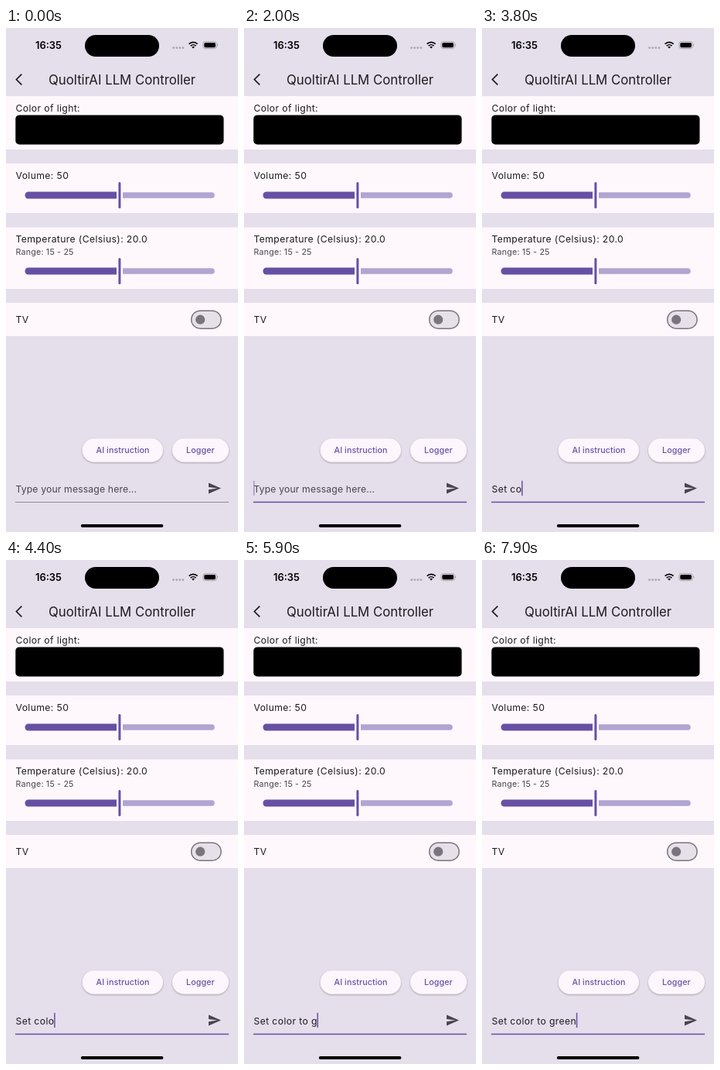
Animation of 300 by 651 pixels, one loop 8 s. Source, as an HTML page:

```html
<!DOCTYPE html>
<html lang="en">
<head>
<meta charset="utf-8">
<title>LLM Controller</title>
<style>
  html, body { margin: 0; width: 100%; height: 100%; overflow: hidden; background: #e5deeb; }
  svg { display: block; width: 300px; height: 651px; }
  text { font-family: Inter, Roboto, sans-serif; font-optical-sizing: none; fill: #1d1b20; white-space: pre; }
  .title { font-size: 16.8px; }
  .body { font-size: 12.2px; letter-spacing: .38px; }
  .small { font-size: 10.7px; letter-spacing: .19px; fill: #49454f; }
  .label { font-size: 10.7px; letter-spacing: .08px; font-weight: 500; fill: #6750a4; text-anchor: middle; }
  .clock { font-size: 12.9px; font-weight: 600; fill: #000; }
  #hint { letter-spacing: .15px; fill: #49454f; }
  .card { fill: #fef8fd; }
  .pill { fill: #fdf6fc; filter: drop-shadow(0 1px 1px rgba(0, 0, 0, .27)); }
  .purple { fill: #6750a4; }
</style>
</head>
<body>
<svg viewBox="0 0 300 651">
  <defs>
    <g id="slider">
      <path class="purple" d="M143-4.5H29a4.5 4.5 0 0 0 0 9H143z"/>
      <path fill="#b1a5d2" d="M151-3.8H266a3.8 3.8 0 0 1 0 7.6H151z"/>
      <rect class="purple" x="145.4" y="-17" width="3" height="34" rx="1.5"/>
    </g>
  </defs>
  <rect width="300" height="651" fill="#e5deeb"/>

  <!-- status bar -->
  <text class="clock" x="38" y="27.2">16:35</text>
  <rect x="102" y="9" width="96" height="28" rx="14"/>
  <g fill="#aaa4ae">
    <circle cx="216.6" cy="25.6" r="1.4"/><circle cx="220.7" cy="25.6" r="1.4"/>
    <circle cx="224.8" cy="25.6" r="1.4"/><circle cx="228.9" cy="25.6" r="1.4"/>
  </g>
  <g fill="none" stroke="#000" stroke-width="1.7">
    <path d="M236.6 20.7a7.8 7.8 0 0 1 11 0"/>
    <path d="M238.7 23.1a4.9 4.9 0 0 1 6.8 0"/>
  </g>
  <path d="M240.2 24.6a2.8 2.8 0 0 1 3.8 0L242.1 26.6z"/>
  <rect x="254.9" y="17.6" width="17.4" height="9" rx="2.7" fill="none" stroke="#99949e" stroke-width=".8"/>
  <rect x="256.3" y="19" width="14.6" height="6.2" rx="1.6"/>
  <path d="M273.3 20.6a1.7 1.7 0 0 1 0 3z" fill="#99949e"/>

  <!-- app bar -->
  <path d="M20.3 59.6L13.4 66.5L20.3 73.4" fill="none" stroke="#1d1b20" stroke-width="1.7"/>
  <text class="title" x="55" y="72.6">QuoltirAI LLM Controller</text>

  <!-- cards -->
  <rect class="card" y="88" width="300" height="69"/>
  <rect class="card" y="175" width="300" height="64"/>
  <rect class="card" y="257.5" width="300" height="79.5"/>
  <rect class="card" y="355" width="300" height="43"/>
  <text class="body" x="12.5" y="108">Color of light:</text>
  <rect x="12.3" y="112.4" width="269.2" height="38" rx="5"/>
  <text class="body" x="12.5" y="195">Volume: 50</text>
  <use href="#slider" y="216"/>
  <text class="body" x="12.5" y="277.4">Temperature (Celsius): 20.0</text>
  <text class="small" x="12.5" y="293.3">Range: 15 - 25</text>
  <use href="#slider" y="314"/>
  <text class="body" x="12.5" y="381.4">TV</text>
  <rect x="239.7" y="365.2" width="38.4" height="23" rx="11.5" fill="#e6e0e9" stroke="#79747e" stroke-width="1.5"/>
  <circle cx="251.2" cy="376.7" r="6.1" fill="#79747e"/>

  <!-- buttons -->
  <rect class="pill" x="98.6" y="530.2" width="104.4" height="30.6" rx="15.3"/>
  <text class="label" x="151" y="549.4">AI instruction</text>
  <rect class="pill" x="215" y="530.2" width="73" height="30.6" rx="15.3"/>
  <text class="label" x="251.4" y="549.4">Logger</text>

  <!-- message field -->
  <text class="body" id="hint" x="12.5" y="599.9">Type your message here...</text>
  <text class="body" id="typed" x="12.5" y="599.9"></text>
  <rect class="purple" id="caret" y="584.7" width="1.5" height="19.4" rx=".7"/>
  <path fill="#49454f" d="M262 601.6L278 594.6L262 587.6V593L273.4 594.6L262 596.2z"/>
  <rect x="12" y="612.1" width="276" height=".8" fill="#79747e"/>
  <rect class="purple" id="line" x="12" y="611.7" width="276" height="1.5"/>
  <rect x="96.8" y="641" width="106.6" height="4" rx="2"/>
</svg>
<script>
  const LOOP = 8000, FOCUS = 1390, LINE_FADE = 167, LEFT = 12.5;
  const MESSAGE = "Set color to green";
  // One key press time per character.
  const KEYS = [2190, 2590, 2890, 2990, 3190, 3590, 4090, 4290, 4490,
                4690, 4890, 4990, 5390, 5890, 6090, 6390, 6490, 6690];
  const [hint, typed, caret, line] =
    ["hint", "typed", "caret", "line"].map(id => document.getElementById(id));

  const clamp = v => Math.min(1, Math.max(0, v));

  // Stepped blink: solid, four steps out, pause, four steps in.
  function blink(ms) {
    const p = (ms % 1000) / 1000;
    if (p < .5) return 1;
    if (p < .65) return .75 - .25 * Math.floor((p - .5) / .0375 - 1 + 1e-6);
    if (p < .85) return 0;
    return .25 * Math.floor((p - .85) / .0375 + 1e-6);
  }

  function draw(t) {
    const count = KEYS.filter(k => k <= t).length;
    const text = MESSAGE.slice(0, count);
    if (typed.textContent !== text) typed.textContent = text;
    const since = t - (count ? KEYS[count - 1] : FOCUS);
    const width = count ? typed.getComputedTextLength() : 0;
    caret.setAttribute("x", LEFT + width - .3);
    caret.setAttribute("opacity", since < 0 ? 0 : clamp(blink(since)));
    hint.setAttribute("opacity", count ? 0 : 1);
    line.setAttribute("opacity", clamp((t - FOCUS) / LINE_FADE));
  }

  let start;
  function tick(now) {
    start ??= now;
    draw((now - start) % LOOP);
    requestAnimationFrame(tick);
  }
  draw(0);
  requestAnimationFrame(tick);
</script>
</body>
</html>
```
